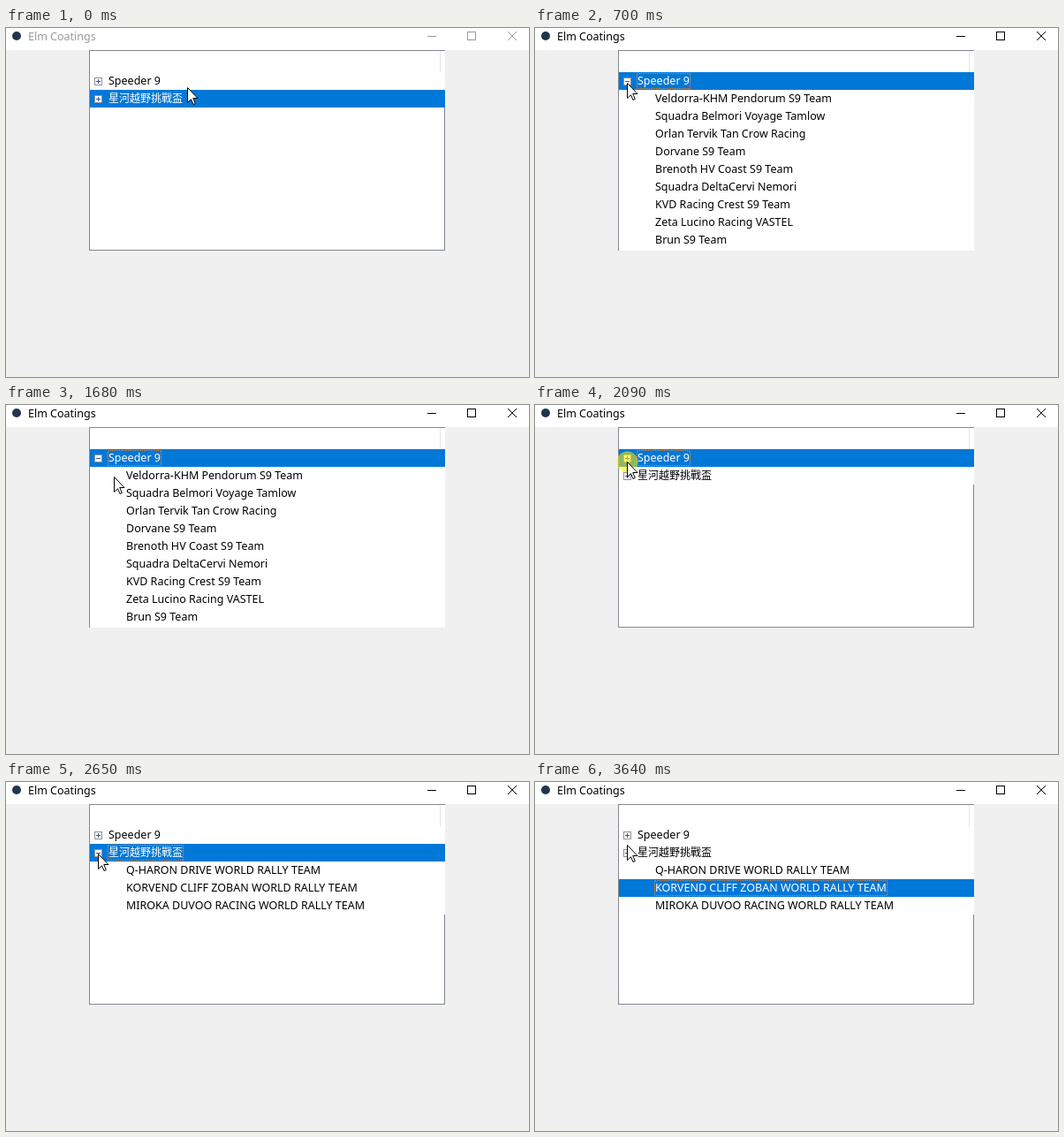
Animation, 592 px wide and 395 px high, one loop 3.78 s. Source, as an HTML page with a canvas:

```html
<!DOCTYPE html>
<html lang="en">
<head>
<meta charset="utf-8">
<title>Elm Coatings</title>
<style>
  html, body { margin: 0; width: 592px; height: 395px; overflow: hidden; background: #f0f0f0; }
  canvas { display: block; }
</style>
</head>
<body>
<canvas id="stage" width="592" height="395"></canvas>
<script>
const ctx = document.getElementById('stage').getContext('2d');
const BEAT = 140, BEATS = 27;
const ROW = 20, TOP = 50, LEFT = 94, RIGHT = 497, BOTTOM = 252;
const LATIN = '12.5px "Noto Sans", "Open Sans", sans-serif';
const HAN = '12px "Noto Sans CJK TC", "Noto Sans CJK SC", "Noto Sans CJK JP", "Noto Sans CJK", sans-serif';

const groups = [
  { name: 'Speeder 9', teams: [
    'Veldorra-KHM Pendorum S9 Team', 'Squadra Belmori Voyage Tamlow',
    'Orlan Tervik Tan Crow Racing', 'Dorvane S9 Team', 'Brenoth HV Coast S9 Team',
    'Squadra DeltaCervi Nemori', 'KVD Racing Crest S9 Team', 'Zeta Lucino Racing VASTEL',
    'Brun S9 Team', 'Pellwick Racing'] },
  { name: '星河越野挑戰盃', han: true, teams: [
    'Q-HARON DRIVE WORLD RALLY TEAM', 'KORVEND CLIFF ZOBAN WORLD RALLY TEAM',
    'MIROKA DUVOO RACING WORLD RALLY TEAM'] }
];

// Pointer stops: beat, x, y
const stops = [
  [0, 205, 67], [2, 150, 55], [4, 105, 57], [5, 104, 62], [6, 104, 62], [10, 148, 104],
  [13, 109, 69], [15, 104, 64], [16, 104, 65], [18, 104, 82], [19, 104, 81],
  [20, 176, 125], [21, 202, 111], [22, 202, 111], [23, 166, 131], [25, 110, 76], [26, 104, 71]
];
const clicks = [
  { beat: 4, glow: 0 }, { beat: 15, glow: 2 }, { beat: 18, glow: 1 }, { beat: 22, glow: 0 }
];

function pointerAt(beat) {
  const i = stops.findIndex(s => s[0] >= beat);
  if (stops[i][0] === beat) return stops[i].slice(1);
  const [b0, x0, y0] = stops[i - 1], [b1, x1, y1] = stops[i];
  const k = (beat - b0) / (b1 - b0);
  return [Math.round(x0 + (x1 - x0) * k), Math.round(y0 + (y1 - y0) * k)];
}

// Replays the clicks so far: left of the labels toggles a group, any click selects.
function viewAt(beat) {
  const done = clicks.filter(c => c.beat <= beat);
  const view = { open: -1, selected: 1, focused: done.length > 0 };
  for (const c of done) {
    const [x, y] = pointerAt(c.beat);
    view.selected = Math.floor((y - TOP) / ROW);
    if (x < 112) view.open = view.open === view.selected ? -1 : view.selected;
  }
  view.scroll = beat >= 9 && beat < 12 ? 2 : 0;
  view.glow = done.some(c => beat < c.beat + c.glow);
  return view;
}

function rect(color, x, y, w, h) {
  ctx.fillStyle = color;
  ctx.fillRect(x, y, w, h);
}

function disc(color, x, y, r) {
  ctx.fillStyle = color;
  ctx.beginPath();
  ctx.arc(x, y, r, 0, 7);
  ctx.fill();
}

function text(str, x, y, color, font) {
  ctx.font = font;
  ctx.fillStyle = color;
  ctx.fillText(str, x, y);
}

function titleBar(active) {
  const ink = active ? '#000' : '#999';
  rect('#fff', 0, 0, 592, 25);
  disc('#23344f', 12, 9, 5);
  text('Elm Coatings', 25, 14, ink, LATIN);
  rect(ink, 477, 9, 10, 1);
  ctx.strokeStyle = ink;
  ctx.lineWidth = 1;
  ctx.strokeRect(522.5, 4.5, 9, 9);
  ctx.beginPath();
  ctx.moveTo(568, 4);
  ctx.lineTo(578, 14);
  ctx.moveTo(578, 4);
  ctx.lineTo(568, 14);
  ctx.stroke();
}

function toggle(y, open) {
  rect('#919191', 100, y + 6, 9, 9);
  rect('#fff', 101, y + 7, 7, 7);
  rect('#3f51a0', 102, y + 10, 5, 1);
  if (!open) rect('#3f51a0', 104, y + 8, 1, 5);
}

// Dots fall on a fixed checkerboard, so all four sides join up.
function focusRing(x, y, w, h) {
  const dot = (px, py) => (px + py) % 2 && rect('#ff8728', px, py, 1, 1);
  for (let i = 0; i < w; i++) {
    dot(x + i, y);
    dot(x + i, y + h - 1);
  }
  for (let i = 1; i < h - 1; i++) {
    dot(x, y + i);
    dot(x + w - 1, y + i);
  }
}

function listRows(open) {
  return groups.flatMap((g, i) => {
    const head = { label: g.name, han: g.han, head: true, open: i === open };
    return [head, ...(head.open ? g.teams.map(label => ({ label })) : [])];
  });
}

function tree(view) {
  rect('#828790', LEFT, 25, RIGHT - LEFT, BOTTOM - 25);
  rect('#fff', LEFT + 1, 26, RIGHT - LEFT - 2, BOTTOM - 27);
  rect('#fff', LEFT + 1, 26, RIGHT - LEFT - 1, TOP - 26);
  rect('#e5e5e5', 491, 26, 1, TOP - 26);

  ctx.save();
  ctx.beginPath();
  ctx.rect(LEFT, TOP, RIGHT - LEFT, BOTTOM - TOP);
  ctx.clip();
  listRows(view.open).forEach((row, i) => {
    const y = TOP + (i - view.scroll) * ROW;
    if (y < TOP || y >= BOTTOM) return;
    const on = i === view.selected, x = row.head ? 116 : 136;
    rect(on ? '#0078d7' : '#fff', LEFT + 1, y, RIGHT - LEFT - 1, ROW);
    if (y + ROW > BOTTOM) return;
    if (row.head) toggle(y, row.open);
    text(row.label, x, y + 14, on ? '#fff' : '#000', row.han ? HAN : LATIN);
    if (on && view.focused) {
      focusRing(x - 1, y + 1, Math.round(ctx.measureText(row.label).width) + 2, 18);
    }
  });
  ctx.restore();
}

function arrow(x, y) {
  const path = [[0, 0], [0, 17], [4, 13.3], [6.5, 19], [8.8, 18], [6.3, 12], [11.5, 12]];
  ctx.beginPath();
  path.forEach(([dx, dy]) => ctx.lineTo(x + dx + .5, y + dy + .5));
  ctx.closePath();
  ctx.fillStyle = '#fff';
  ctx.fill();
  ctx.strokeStyle = '#000';
  ctx.lineWidth = 1;
  ctx.stroke();
}

function draw(now) {
  const t = now % (BEAT * BEATS);
  const beat = Math.min(BEATS - 1, Math.floor((t + 10) / BEAT));
  const view = viewAt(beat), [x, y] = pointerAt(beat);
  rect('#f0f0f0', 0, 0, 592, 395);
  titleBar(view.focused);
  tree(view);
  if (view.glow) disc('rgba(255,240,0,.55)', x + .5, y + .5, 12);
  arrow(x, y);
  requestAnimationFrame(draw);
}
requestAnimationFrame(draw);
</script>
</body>
</html>
```
